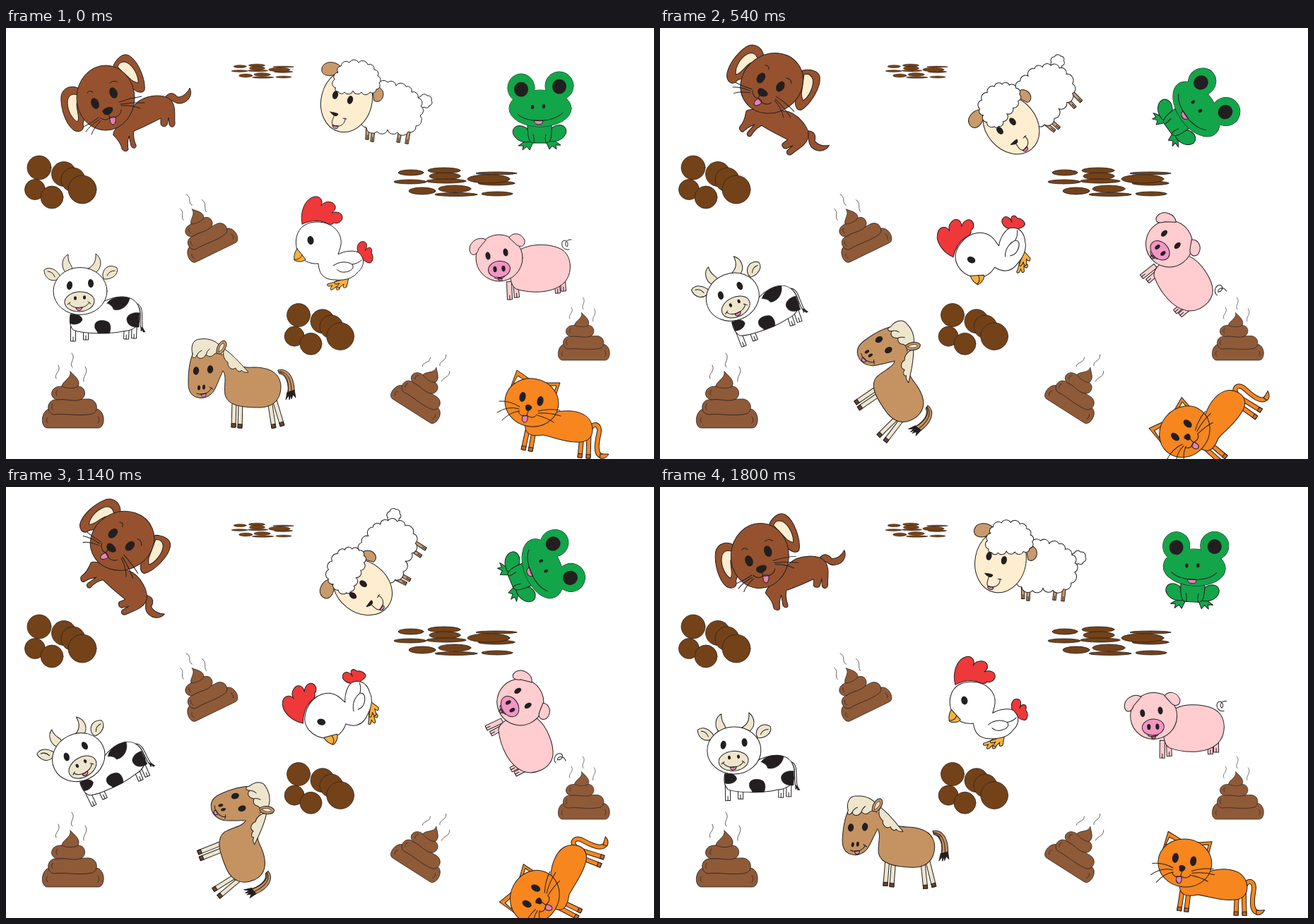
An HTML page that plays this animation: 917x611 px, repeating every 1.83 s.

```html
<!DOCTYPE html>
<html lang="en">
<head>
<meta charset="utf-8">
<title>Farm animals</title>
<style>
html, body { margin: 0; width: 100%; height: 100%; overflow: hidden; background: #fff; }
svg { display: block; width: 917px; height: 611px; }
</style>
</head>
<body>
<svg id="stage" viewBox="0 0 917 611" stroke-linejoin="round" stroke-linecap="round"></svg>
<script>
const ink = '#231f20', pink = '#e880b5', cream = '#ffedd0', bone = '#eee5cd';

// Drawing helpers, each returns SVG markup
const shape = (d, fill = 'none', w = 1) =>
  `<path d="${d}" fill="${fill}" stroke="${ink}" stroke-width="${w}"/>`;
const oval = (x, y, rx, ry, fill = ink, turn = 0, w = 1) =>
  `<ellipse cx="${x}" cy="${y}" rx="${rx}" ry="${ry}" fill="${fill}" stroke="${ink}" stroke-width="${w}" transform="rotate(${turn} ${x} ${y})"/>`;
const dot = (x, y, rx, ry, turn) => oval(x, y, rx, ry, ink, turn, 0);
const tube = (d, width, fill) => [[width, ink], [width - 2, fill]].map(([w, c]) =>
  `<path d="${d}" fill="none" stroke="${c}" stroke-width="${w}"/>`).join('');
const group = (inner, transform) => `<g transform="${transform}">${inner}</g>`;

// Cloud outline: one round bump between each pair of points
function cloud(pts, fill = '#fff') {
  let d = `M${pts[0]}`;
  pts.forEach((a, i) => {
    const b = pts[(i + 1) % pts.length];
    const r = (Math.hypot(a[0] - b[0], a[1] - b[1]) * .56).toFixed(1);
    d += `A${r} ${r} 0 0 1 ${b}`;
  });
  return shape(d + 'Z', fill);
}

// Tapered leg with an optional hoof
function leg(x1, y1, x2, y2, w, fill, hoof) {
  const len = Math.hypot(x2 - x1, y2 - y1);
  const nx = (y1 - y2) / len * w / 2, ny = (x2 - x1) / len * w / 2;
  const quad = (a, b) => {
    const ax = x1 + (x2 - x1) * a, ay = y1 + (y2 - y1) * a;
    const bx = x1 + (x2 - x1) * b, by = y1 + (y2 - y1) * b;
    return `M${ax + nx},${ay + ny}L${bx + nx},${by + ny}L${bx - nx},${by - ny}L${ax - nx},${ay - ny}`;
  };
  let out = shape(quad(0, 1) + 'Z', fill);
  if (hoof === 'split') {
    const k = 1 - 6 / len;
    out += shape(`M${x2},${y2}L${x1 + (x2 - x1) * k},${y1 + (y2 - y1) * k}`);
  } else if (hoof) out += shape(quad(1 - 5 / len, 1) + 'Z', hoof);
  return out;
}

function dog() {
  const c = '#96522f';
  return shape('M226,97C232,90 238,92 243,98C250,98 257,92 260,85C265,96 257,106 246,107C237,107 236,100 230,104Z', c) +
    shape('M183,108C195,94 225,92 234,103C241,112 238,125 239,135C239,141 233,142 231,137L230,127L228,137C226,141 219,140 219,136L219,128C207,134 194,141 181,146C180,153 181,160 184,166C185,172 178,171 177,167L174,153C172,160 172,167 173,172C172,176 165,175 164,171C163,165 158,158 152,152C150,146 165,130 183,108Z', c) +
    shape('M104,86C93,80 80,84 78,97C77,115 85,137 96,145C104,149 112,145 109,136L118,100Z', c) +
    shape('M103,96C94,91 87,96 87,106C87,118 94,129 101,133C105,128 100,118 100,108Z', cream) +
    shape('M152,53C157,42 166,35 174,39C188,47 198,75 196,88C193,94 183,91 177,83L160,70Z', c) +
    shape('M158,55C160,48 166,47 171,49C180,54 188,68 187,78C184,77 181,76 178,74Z', cream) +
    oval(141, 99, 41, 46, c) +
    dot(126, 107, 5.5, 8, -22) + dot(152, 92, 5.5, 8, -22) +
    shape('M115,92Q118,87 123,91M147,78Q153,73 158,77') +
    shape('M137,118C138,114 146,111 150,113C153,116 148,122 144,123C140,123 137,121 137,118Z', ink) +
    shape('M147,128C150,125 153,125 155,127C156,133 154,137 151,137C148,136 147,132 147,128Z', pink) +
    shape('M145,123L147,127C144,131 137,131 133,127M147,127C155,128 163,124 163,116') +
    shape('M160,105Q176,99 192,97M162,108Q180,105 196,106M163,110Q178,109 190,114M131,127Q120,135 110,140M132,130Q119,138 113,147M134,132Q124,141 121,151');
}

function sheep() {
  const c = '#c99a6b';
  return [[512, 140, 511, 158], [520, 142, 518, 161], [558, 146, 555, 162], [570, 146, 567, 164]]
      .map(l => leg(...l, 4.5, c, 'split')).join('') +
    cloud([[584, 101], [587, 97], [596, 96], [602, 103], [599, 110], [592, 112], [586, 109]]) +
    cloud([[516, 95], [527, 80], [540, 77], [552, 82], [566, 83], [574, 91], [583, 99], [587, 111], [586, 124], [580, 139], [569, 147], [554, 148], [540, 144], [525, 147], [510, 141], [504, 130], [505, 112]]) +
    shape('M474,55C466,46 450,46 447,57C445,66 455,70 466,66Z', c) +
    shape('M519,86C525,80 533,85 534,93C534,102 527,107 521,103Z', c) +
    oval(482, 103, 36, 45, cream, 14) +
    cloud([[466, 85], [465, 73], [470, 63], [474, 54], [486, 49], [499, 49], [512, 52], [521, 59], [526, 68], [528, 78], [524, 87], [515, 91], [503, 91], [491, 89], [479, 91], [470, 90]]) +
    dot(466, 95, 4, 6, 15) + dot(487, 102, 4, 6, 15) +
    shape('M459,119C463,120 467,120 470,122C468,126 464,126 459,119Z', ink) +
    shape('M462,138L470,139C470,145 462,143 462,138Z', pink) +
    shape('M464,125C463,129 460,133 462,137C470,142 480,138 480,128M477,128L482,129');
}

function frog() {
  const c = '#13a54a';
  const foot = 'M742,159C735,159 731,163 725,167L732,167L731,173L737,168L741,173L745,164Z';
  const thigh = 'M737,142C723,133 713,143 719,153C725,162 736,163 742,161Z';
  const flip = 'matrix(-1 0 0 1 1510 -1)';
  const limbs = shape(foot, c) + shape(thigh, c);
  const head = [[729, 85, 19, 20], [783, 82, 20, 20], [756, 114, 44, 26]];
  return limbs + group(limbs, flip) +
    shape('M738,138C738,150 739,164 747,163L765,163C773,162 772,147 772,138Z', c) +
    shape('M746,151Q748,157 747,163M764,151Q762,157 764,163') +
    head.map(h => oval(...h, c)).join('') +
    head.map(h => oval(...h, c, 0, 0)).join('') +
    dot(729, 87, 10, 10.5) + dot(783, 83, 10, 10.5) +
    dot(745, 112, 2.2, 3) + dot(761, 111, 2.2, 3) +
    shape('M747,131L760,131C760,139 748,139 747,131Z', pink) +
    shape('M724,122C736,135 774,135 788,120');
}

function hen() {
  const red = '#ef3839', gold = '#fbb03f';
  const foot = 'M470,356C466,361 461,361 455,363C453,366 457,367 462,365C458,369 458,372 462,371L468,366C466,371 468,373 472,370L475,357Z';
  return shape('M498,319C495,308 500,301 507,303C512,305 511,312 508,316C513,308 520,311 517,319C521,323 519,334 514,333C508,332 502,326 498,319Z', red) +
    shape(foot, gold) + group(shape(foot, gold), 'translate(10 -3)') +
    shape('M413,318C406,300 412,275 440,275C465,275 476,293 474,307C473,313 471,317 470,321C480,315 495,315 500,319C510,330 505,340 497,347C489,357 475,358 466,357C451,357 443,350 442,334C430,335 418,330 413,318Z', '#fff') +
    shape('M419,277C416,262 422,242 437,239C446,238 449,246 446,252C452,243 465,246 466,253C467,257 463,261 461,262C470,259 477,263 476,270C474,276 468,278 464,276C462,280 455,278 453,276C440,271 428,274 419,278Z', red) +
    shape('M412,313L424,328C420,333 410,331 408,329C407,322 409,317 412,313Z', gold) +
    shape('M408,328C413,329 417,326 419,322') +
    dot(431, 301, 4.5, 6, -10) +
    shape('M463,337C474,329 485,332 490,335C494,341 487,345 480,346C474,347 470,344 468,342M490,335Q498,334 503,329');
}

function pig() {
  const c = '#ffcccf';
  return [[712, 360, 713, 385], [721, 360, 723, 382], [780, 364, 781, 376], [788, 358, 789, 373]]
      .map(l => leg(...l, 7, c, 'split')).join('') +
    shape('M797,314C789,316 784,307 788,302C793,299 797,305 794,310C789,308 792,299 800,300') +
    shape('M728,314C745,304 775,306 788,315C801,325 802,348 790,361C775,376 745,377 722,370C708,362 712,325 728,314Z', c) +
    oval(698, 326, 33, 33, c) +
    shape('M679,300C668,294 655,304 656,315C658,324 666,324 669,313Z', c) +
    shape('M712,297C717,289 729,290 734,301C735,309 728,313 721,306Z', c) +
    dot(682, 323, 3.5, 5.5, -10) + dot(707, 318, 3.5, 5.5, -10) +
    shape('M696,355L702,354C703,360 697,360 696,355Z', pink) +
    shape('M691,354Q699,359 706,352') +
    oval(698, 342, 15.5, 11.5, '#f395c3', -8) +
    dot(692, 342, 2.6, 4.2, -5) + dot(704, 341, 2.6, 4.2, -5);
}

function cow() {
  const w = '#fff';
  const patches = 'M143,390C150,380 165,380 175,383C173,395 161,402 152,399C151,394 147,392 143,390ZM189,404C178,402 170,408 171,414C172,422 180,425 188,424ZM126,420C128,412 143,414 146,418C150,424 147,432 146,433L130,433C129,428 124,427 126,420ZM91,406C100,404 108,408 108,414C104,421 95,421 91,419Z';
  return [[95, 420, 95, 444], [113, 424, 113, 442], [171, 420, 170, 441], [182, 415, 181, 440]]
      .map(l => leg(...l, 7, w, 'split')).join('') +
    shape('M183,390C194,395 188,413 191,425M186,391C197,396 190,415 194,427') +
    shape('M191,424L191,430L193,428L194,431L197,431L194,426Z', ink, .6) +
    shape('M96,398C88,408 89,421 95,428C108,434 150,434 165,430C182,429 190,421 190,406C189,388 178,381 164,381C148,381 135,390 120,395Z', w) +
    shape(patches, ink, .5) +
    shape('M94,342C93,334 87,334 88,321C78,326 78,340 84,346Z', bone) +
    shape('M116,341C123,338 128,331 127,320C136,327 136,339 128,346Z', bone) +
    shape('M72,357C62,361 54,352 54,343C62,337 72,343 77,352Z', bone) +
    shape('M137,352C136,342 145,333 157,340C160,349 150,357 139,356Z', bone) +
    shape('M59,345Q66,345 69,353M154,344Q146,344 143,351') +
    oval(105, 373, 38, 33.5, w) +
    dot(90, 365, 4, 6, 10) + dot(120, 362, 4, 6, -5) +
    oval(104, 388, 21, 14, bone, -4) +
    dot(98, 383, 2, 2.8) + dot(111, 382, 2, 2.8) +
    shape('M99,397L108,396C107,402 100,402 99,397Z', pink) +
    shape('M89,390C94,399 112,399 118,389M87,392L91,389M116,388L120,391');
}

function horse() {
  const c = '#c59362', hoof = '#6b4426';
  return shape('M385,485C400,481 408,497 408,514L405,521L398,521C402,505 396,491 387,490Z', c) +
    shape('M387,487C401,487 405,505 404,522M386,488C398,489 401,505 399,518') +
    shape('M398,516L396,527L400,521L401,527L403,521L404,526L406,520L410,524L408,513', ink, .8) +
    leg(323, 530, 322, 566, 6, bone, hoof) + leg(332, 530, 331, 567, 6, bone, hoof) +
    leg(373, 528, 379, 567, 6, bone, hoof) + leg(379, 524, 391, 564, 6, bone, hoof) +
    shape('M296,470L307,486C313,495 308,505 310,520C314,536 335,538 360,538C380,537 389,525 389,508C388,490 375,481 350,481C335,482 324,480 312,460Z', c) +
    shape('M268,455C280,448 298,449 303,458C309,470 308,480 306,488C302,497 299,505 295,513C290,522 280,526 272,524C262,522 258,515 258,503C258,485 260,467 268,455Z', c) +
    `<path d="M301,466L309,462L318,482L306,486Z" fill="${c}"/>` +
    shape('M309,455C317,460 331,474 343,488C338,489 335,487 333,485C332,489 326,486 325,482C318,487 313,478 314,474C308,470 306,462 309,455Z', bone) +
    shape('M264,462C261,452 264,441 275,441C288,439 302,445 306,456C300,462 296,460 294,463C290,468 285,465 283,463C279,470 272,470 270,464C267,470 262,468 264,462Z', bone) +
    shape('M270,464Q272,459 277,457M283,463Q284,458 288,455') +
    shape('M298,461C297,452 303,443 309,443C315,446 311,457 304,462Z', c) +
    shape('M301,459C301,452 305,447 308,447C310,450 307,456 301,459Z', bone, .7) +
    dot(269, 486, 4.2, 5.7, 5) + dot(289, 484, 4.2, 5.7, 5) +
    dot(273, 510, 2, 3.5, 5) + dot(280, 509, 2, 3.5, 5) +
    shape('M276,519L283,518C284,525 277,525 276,519Z', pink) +
    shape('M270,518C278,522 288,517 291,510M288,509L293,512');
}

function cat() {
  const c = '#f7861f';
  return tube('M827,568C833,557 842,564 839,575C836,588 833,606 844,607', 7, c) +
    shape('M841,604C846,604 849,604 853,604C850,609 846,611 841,610Z', c) +
    [[738, 570, 732, 598], [747, 572, 742, 600], [815, 578, 812, 609], [825, 575, 824, 610]]
      .map(l => leg(...l, 6, c, '#c66a1c')).join('') +
    shape('M735,558C755,550 780,541 800,543C820,545 830,555 830,570C830,582 820,588 808,587C790,587 775,580 760,577C745,579 732,578 735,558Z', c) +
    shape('M711,518L723,485L743,499Z', c) + shape('M718,504L724,493L734,499Z', cream) +
    shape('M762,503L784,503L777,524Z', c) + shape('M770,507L779,507L776,516Z', cream) +
    oval(744, 531, 38, 34, c, 10) +
    dot(731, 523, 4.5, 7, 12) + dot(756, 529, 4.5, 7, 12) +
    shape('M736,535C739,533 743,535 744,538C743,542 738,544 736,541Z', ink) +
    shape('M732,549L738,550C739,557 736,560 733,559C729,557 730,552 732,549Z', pink) +
    shape('M739,543L737,549C731,552 726,548 725,543M737,549C743,554 749,552 751,548') +
    shape('M727,537Q713,528 698,529M726,540Q711,535 695,545M727,543Q714,544 702,556M753,543Q769,539 784,542M753,546Q770,545 785,550M752,549Q766,553 775,559');
}

const pats = [[47, 198, 17], [82, 207, 17.5], [95, 215, 17], [108, 229, 20], [41, 229, 14.5], [65, 240, 16]]
  .map(([x, y, r]) => oval(x, y, r, r, '#744218', 0, .7)).join('');

const flats = [[573, 205, 18, 4], [620, 202, 23, 4], [621, 210, 22, 5], [572, 218, 23, 3], [623, 217, 28, 3],
  [694, 206, 29, 2], [694, 220, 26, 3], [683, 214, 30, 6], [589, 231, 19, 5], [637, 236, 30, 2.5], [635, 228, 23, 5], [695, 235, 22, 3]]
  .map(f => oval(...f, '#744218', 0, .8)).join('');

// Pile with its base centred on 0,0
const brown = '#8f5a38';
const pile = shape('M-34,-27C-46,-24 -47,0 -36,0L36,0C46,-1 46,-25 33,-27Z', brown, .8) +
  shape('M-27,-40C-39,-37 -37,-20 -27,-19C-10,-21 8,-16 27,-20C36,-23 36,-39 23,-41Z', brown, .8) +
  shape('M-4,-80C-2,-70 -15,-67 -16,-59C-33,-60 -35,-42 -22,-40C-10,-42 2,-36 12,-41C20,-46 17,-59 7,-59C11,-67 3,-73 -4,-80Z', brown, .8) +
  shape('M-16,-59C-10,-56 2,-55 7,-59M-36,-15Q-40,-11 -36,-7M35,-16Q39,-11 35,-7M-29,-34Q-32,-30 -29,-26M-22,-54Q-26,-50 -23,-46', 'none', .7) +
  shape('M-24,-70C-28,-77 -16,-80 -21,-89M-1,-86C-7,-92 5,-98 -2,-106M15,-66C13,-74 23,-78 17,-87', 'none', .7);

const litter = pats + group(pats, 'translate(368.4 215) scale(.97)') +
  flats + group(flats, 'translate(41.2 -48) scale(.506 .5)') +
  [[95, 567, 0, 1], [818, 471, 0, .84], [297, 318, -26, .87], [574, 543, 32.5, .88]]
    .map(([x, y, turn, s]) => group(pile, `translate(${x} ${y}) rotate(${turn}) scale(${s})`)).join('');

// Drawing, pivot and swing in degrees
const cast = [
  [dog, 170, 105.5, 90], [sheep, 523, 105.5, -90], [frog, 756.5, 117.5, 91], [hen, 463, 305.5, -90],
  [pig, 729, 338, 90], [cow, 126, 383, -35], [horse, 333, 504, 90], [cat, 779, 553, -100]
];

const stage = document.getElementById('stage');
stage.innerHTML = cast.map(([draw]) => `<g class="animal">${draw()}</g>`).join('') + litter;
const animals = stage.querySelectorAll('.animal');

const step = 30, steps = 61, turnAt = 30;
const start = performance.now();

function render(now) {
  const k = Math.floor(Math.max(0, now - start) / step) % steps;
  const swing = k <= turnAt ? k / turnAt : (steps - k) / (steps - turnAt);
  cast.forEach(([, x, y, angle], i) =>
    animals[i].setAttribute('transform', `rotate(${angle * swing} ${x} ${y})`));
  requestAnimationFrame(render);
}
render(start);
</script>
</body>
</html>
```
